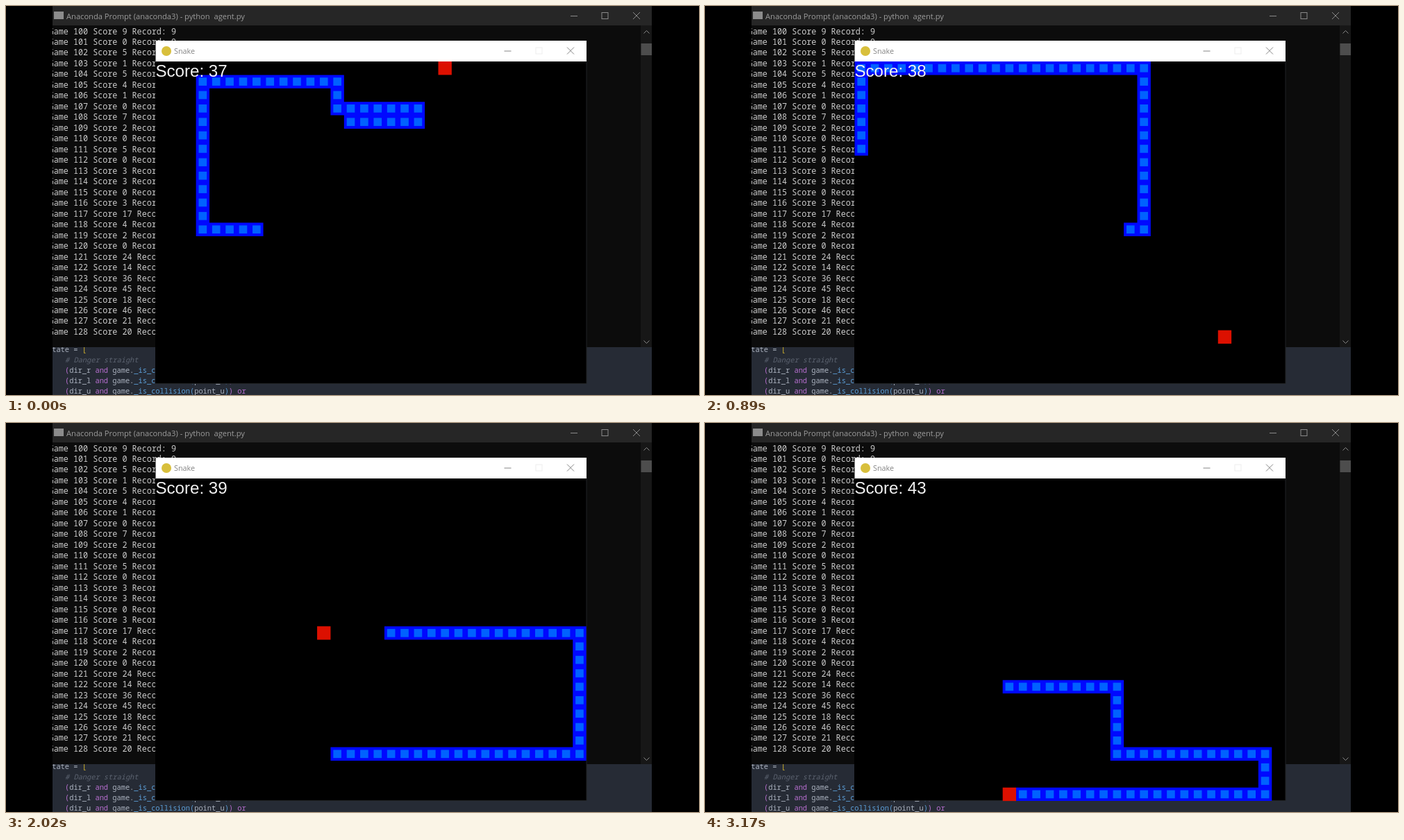
An HTML page with a canvas that plays this animation: 998x561 px, repeating every 3.2 s.

```html
<!DOCTYPE html>
<html lang="en">
<head>
<meta charset="utf-8">
<title>Snake agent</title>
<style>
html, body { margin: 0; width: 100%; height: 100%; overflow: hidden; background: #000; }
canvas { display: block; }
</style>
</head>
<body>
<canvas id="stage" width="998" height="561"></canvas>
<script>
const ctx = document.getElementById('stage').getContext('2d');
const LOOP = 3200;
const MONO = '"Noto Sans Mono", "DejaVu Sans Mono", monospace';
const UI = '"Open Sans", "Noto Sans", sans-serif';
const BOARD = { x: 215.5, y: 80, cell: 19.38 };

// Corners of the route; the first 40 cells are the snake at the start.
const corners = [
  [14, 4], [19, 4], [19, 3], [13, 3], [13, 1], [3, 1], [3, 12], [21, 12],
  [21, 0], [0, 0], [0, 20], [31, 20], [31, 11], [5, 11], [5, 15], [19, 15],
  [19, 20], [30, 20], [30, 23], [12, 23]
];
const foods = [[21, 0], [27, 20], [12, 11], [5, 13], [19, 15], [30, 20], [11, 23]];
const START_HEAD = 39, START_SCORE = 37;

// Moves made by a given tick, linear in between.
const pace = [[0, 0], [14, 26], [27, 53], [38, 75], [53, 106], [71, 140], [96, 188]];

function walk(points) {
  const cells = [points[0]];
  for (const [x, y] of points.slice(1)) {
    let [cx, cy] = cells[cells.length - 1];
    while (cx !== x || cy !== y) {
      cx += Math.sign(x - cx);
      cy += Math.sign(y - cy);
      cells.push([cx, cy]);
    }
  }
  return cells;
}

const route = walk(corners);
let last = START_HEAD;
const eatenAt = foods.map(([x, y]) => {
  const i = route.findIndex((c, k) => k > last && c[0] === x && c[1] === y);
  if (i < 0) return Infinity;
  return last = i;
});

function rect(x, y, w, h, color) {
  ctx.fillStyle = color;
  ctx.fillRect(x, y, w, h);
}

function text(str, x, y, font, color) {
  ctx.font = font;
  ctx.fillStyle = color;
  ctx.fillText(str, x, y);
}

function line(points, color) {
  ctx.strokeStyle = color;
  ctx.lineWidth = 1;
  ctx.beginPath();
  points.forEach(([x, y], i) => i ? ctx.lineTo(x, y) : ctx.moveTo(x, y));
  ctx.stroke();
}

function controls(xs, y, color, boxColor) {
  const [min, max, close] = xs;
  line([[min - 5, y + .5], [min + 5, y + .5]], color);
  ctx.strokeStyle = boxColor;
  ctx.strokeRect(max - 4.5, y - 4.5, 9, 9);
  line([[close - 5, y - 5], [close + 5, y + 5]], color);
  line([[close - 5, y + 5], [close + 5, y - 5]], color);
}

function drawEditor() {
  rect(67, 492, 863, 69, '#262b35');
  const grey = '#abb2bf', purple = '#b86fd0', blue = '#5c9fd8', gold = '#d9b62c';
  const cond = (p, rest) => [
    ['(', purple], ['dir_' + p + ' ', grey], ['and ', purple], ['game.', grey],
    ['_is_collision', blue], ['(', blue], ['point_' + p, grey], [')', blue],
    [')', purple], [' or', purple]
  ];
  const rows = [
    [60, [['state ', grey], ['= ', grey], ['[', gold]]],
    [85, [['# Danger straight', '#5c6370']]],
    [85, cond('r')], [85, cond('l')], [85, cond('u')]
  ];
  rows.forEach(([x, parts], i) => {
    for (const [str, color] of parts) {
      text(str, x, 498.5 + i * 15.1, (i === 1 ? 'italic ' : '') + '10.35px ' + MONO, color);
      x += ctx.measureText(str).width;
    }
  });
}

function drawTerminal() {
  rect(67, 0, 863, 492, '#0c0c0c');
  rect(67, 0, 863, 28, '#262626');
  rect(69, 8, 14, 11, '#8c8c8c');
  text('Anaconda Prompt (anaconda3) - python  agent.py', 87, 18.5, '11.15px ' + UI, '#9c9c9c');
  controls([818, 862.5, 908], 14, '#8a8a8a', '#8a8a8a');

  const scores = [9, 0, 5, 1, 5, 4, 1, 0, 7, 2, 0, 5, 0, 3, 3, 0, 3, 17, 4, 2, 0,
    24, 14, 36, 45, 18, 46, 21, 20];
  let record = 9;
  scores.forEach((s, i) => {
    record = Math.max(record, s);
    text(`Game ${100 + i} Score ${s} Record: ${record}`, 61.7, 40.5 + i * 15.48,
      '11.75px ' + MONO, '#cccccc');
  });

  rect(914, 28, 16, 464, '#171717');
  rect(914.5, 54, 15.5, 17, '#4d4d4d');
  line([[918.5, 39.5], [922.5, 35.5], [926.5, 39.5]], '#8a8a8a');
  line([[918.5, 482.5], [922.5, 486.5], [926.5, 482.5]], '#8a8a8a');
}

function drawWindow() {
  rect(215, 50, 621, 494.5, '#000');
  line([[836, 80], [836, 544.5], [215, 544.5]], '#202224');
  rect(215.5, 50, 620.5, 30, '#fff');
  ctx.fillStyle = '#d8bf3c';
  ctx.beginPath();
  ctx.arc(231, 65, 7, 0, Math.PI * 2);
  ctx.fill();
  text('Snake', 242, 69, '10.8px ' + UI, '#858585');
  controls([722.5, 767.5, 813], 64.5, '#858585', '#eeeeee');
}

function block([col, row], inset, color) {
  const { x, y, cell } = BOARD;
  const left = x + col * cell + inset, top = y + row * cell + inset;
  rect(left, top, cell - 2 * inset, cell - 2 * inset, color);
}

function movesAt(tick) {
  const i = Math.max(1, pace.findIndex(p => p[0] >= tick));
  const [t0, m0] = pace[i - 1], [t1, m1] = pace[i];
  return Math.round(m0 + (m1 - m0) * (tick - t0) / (t1 - t0));
}

function drawGame(tick) {
  const head = START_HEAD + movesAt(tick);
  const eaten = eatenAt.filter(i => i <= head).length;
  const score = START_SCORE + eaten;
  const body = route.slice(head - score - 2, head + 1);
  // Joined runs keep the seams between cells solid.
  ctx.strokeStyle = '#0008ff';
  ctx.lineWidth = BOARD.cell;
  ctx.lineCap = 'square';
  ctx.lineJoin = 'miter';
  ctx.beginPath();
  body.forEach(([c, r], i) => {
    const x = BOARD.x + (c + .5) * BOARD.cell, y = BOARD.y + (r + .5) * BOARD.cell;
    i ? ctx.lineTo(x, y) : ctx.moveTo(x, y);
  });
  ctx.stroke();
  ctx.lineCap = 'butt';
  body.forEach(c => block(c, 3.88, '#0062ff'));
  block(foods[eaten], 0, '#dc1000');
  text('Score: ' + score, 215.5, 102.3, '24.1px "Liberation Sans", Arial, sans-serif', '#f2f2f2');
}

function draw(now) {
  const t = now % LOOP;
  const tick = t < 30 ? 0 : Math.min(96, Math.floor((t - 30) / 33.125 + .25) + 1);
  rect(0, 0, 998, 561, '#000');
  ctx.save();
  ctx.beginPath();
  ctx.rect(67, 0, 863, 561);
  ctx.clip();
  drawEditor();
  drawTerminal();
  drawWindow();
  drawGame(tick);
  ctx.restore();
}

const begin = performance.now();
function loop() {
  draw(performance.now() - begin);
  requestAnimationFrame(loop);
}
loop();
</script>
</body>
</html>
```
